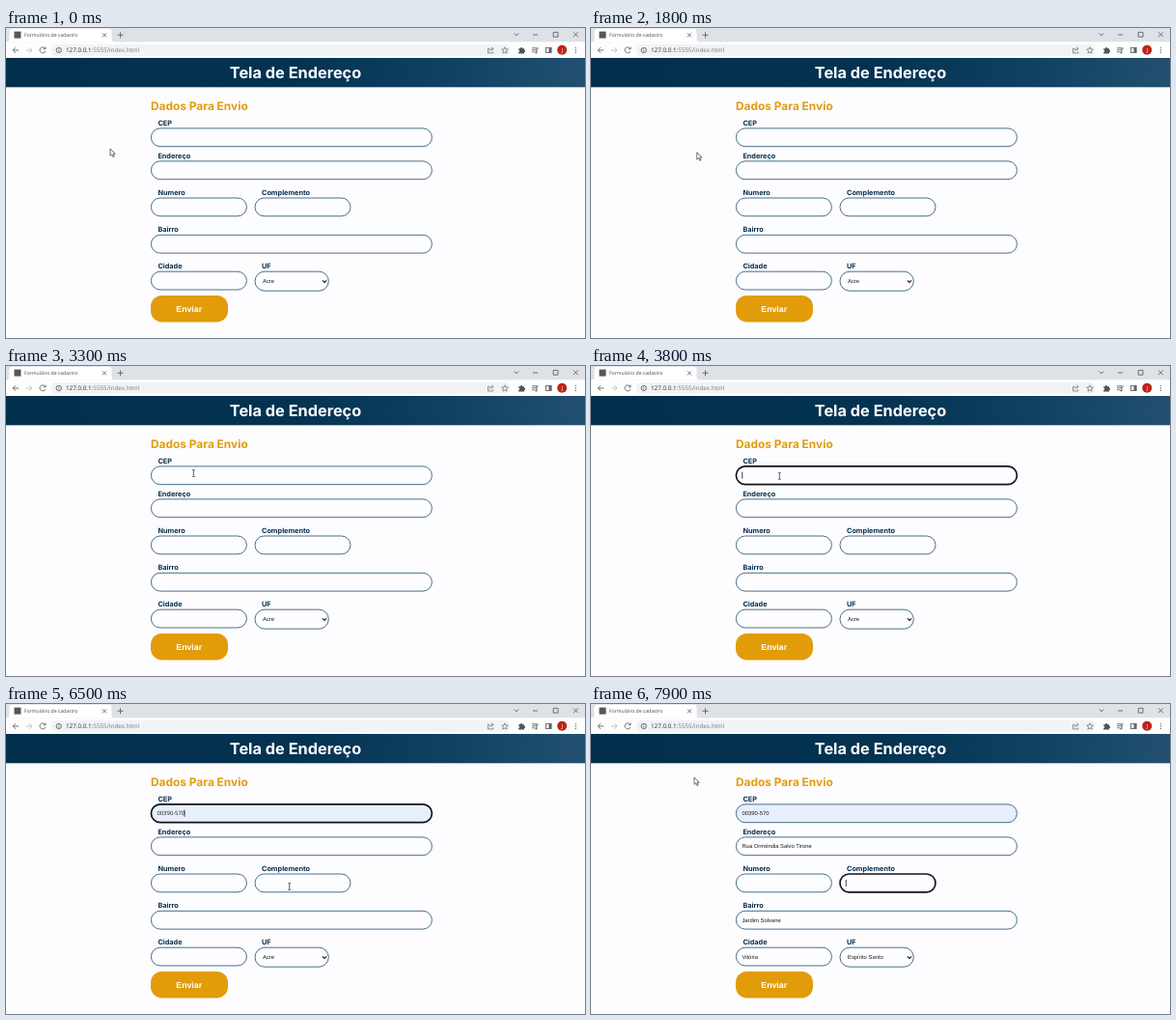
Animation of 600 by 321 pixels, one loop 8000 ms. Source, as an HTML page:

```html
<!DOCTYPE html>
<html lang="pt-BR">
<head>
<meta charset="utf-8">
<title>Formulário de cadastro</title>
<style>
  html, body { margin: 0; width: 100%; height: 100%; overflow: hidden; background: #fdfcfe; }
  svg { display: block; width: 100vw; height: 100vh; }
  text { text-rendering: geometricPrecision; white-space: pre; }
  .ui { font-family: "Open Sans", "Noto Sans", sans-serif; }
  .heading { font-family: Inter, "Open Sans", sans-serif; font-weight: 700; }
  .label { font-family: Inter, "Open Sans", sans-serif; font-weight: 700; font-size: 7.3px; fill: #07304f; }
  .value { font-family: "Liberation Sans", Arial, sans-serif; font-size: 5.86px; fill: #1b1b1b; }
  .value.preview { font-family: "Open Sans", "Noto Sans", sans-serif; }
  .icon { fill: none; stroke: #5f6368; stroke-width: .9; }
  .field { fill: #fefdff; stroke: #35607c; stroke-width: .9; }
  .field.filled { fill: #e7effd; }
  .field.focus { stroke: #10141c; stroke-width: 1.7; }
</style>
</head>
<body>
<svg viewBox="0 0 600 321" preserveAspectRatio="none">
  <defs>
    <linearGradient id="band" gradientUnits="userSpaceOnUse" x1="0" y1="31" x2="600" y2="61">
      <stop offset="0" stop-color="#022f4b"/>
      <stop offset=".5" stop-color="#043352"/>
      <stop offset=".75" stop-color="#0f4062"/>
      <stop offset="1" stop-color="#235070"/>
    </linearGradient>
  </defs>
  <rect width="600" height="321" fill="#fdfcfe"/>

  <!-- tab strip -->
  <rect width="600" height="14.5" fill="#dee1e6"/>
  <path d="M0 14.5Q3.5 14.5 3.5 11V4Q3.5 .8 7 .8H106Q109.5 .8 109.5 4V11Q109.5 14.5 113 14.5Z" fill="#fff"/>
  <rect x="8.5" y="3.6" width="7" height="7" fill="#55565a"/>
  <text class="ui" x="19" y="9.2" font-size="5.1" fill="#45484d">Formulário de cadastro</text>
  <path class="icon" d="M100 5.4l4 4m0-4l-4 4M118.5 4.3v6m-3-3h6M526.7 5.6l2.3 2.2 2.3-2.2M546 7h5M567.2 4.4h4.8v4.8h-4.8zM588 4.4l4.8 4.8m0-4.8l-4.8 4.8"/>

  <!-- toolbar -->
  <rect y="14.5" width="600" height="16.5" fill="#fefefe"/>
  <rect x="46.5" y="16.7" width="476" height="12.6" rx="6.3" fill="#f1f3f4"/>
  <path class="icon" d="M13.2 23H7.2m2.8-2.8L7.2 23l2.8 2.8M40.6 21.3a3 3 0 1 0 .2 2.7M41 19.6v2.2h-2.2"/>
  <path class="icon" style="stroke:#b9bcc0" d="M21 23h6m-2.8-2.8L27 23l-2.8 2.8"/>
  <circle class="icon" cx="54.7" cy="23" r="2.7" stroke-width=".7"/>
  <path class="icon" stroke-width=".8" d="M54.7 22.7v1.8m0-3.1v.7"/>
  <text class="ui" x="62" y="25.2" font-size="6.3" fill="#27292d">127.0.0.1<tspan fill="#73777d">:5555/index.html</tspan></text>
  <path class="icon" style="stroke-width:.7" d="M501.5 21.3h-2v4.6h5.3v-1.5M501.2 24q.3-2.4 3.2-2.5m-1.2-1.7l2 1.7-2 1.7"/>
  <path class="icon" style="stroke-width:.7" d="M517 19.8l1 2.2 2.3.2-1.8 1.6.6 2.3-2.1-1.2-2.1 1.2.6-2.3-1.8-1.6 2.3-.2z"/>
  <path fill="#4f5358" d="M531.2 21.2h1.8a1.1 1.1 0 0 1 2.2 0h1.8v1.6a1.1 1.1 0 0 1 0 2.2v1.4h-5.8v-1.5a1.1 1.1 0 0 0 0-2.2z"/>
  <path class="icon" d="M545 20.8h5M545 22.8h5M545 24.8h2.8M550 25.6V21h1.8"/>
  <circle cx="549.3" cy="25.4" r="1" fill="#5f6368"/>
  <rect class="icon" x="559.5" y="20.3" width="5.6" height="5.2"/>
  <rect x="562.5" y="20.3" width="2.6" height="5.2" fill="#5f6368"/>
  <circle cx="576.2" cy="22.8" r="5" fill="#bd2418"/>
  <text class="ui" x="576.2" y="24.9" font-size="5.6" fill="#fff" text-anchor="middle">J</text>
  <g fill="#5f6368"><circle cx="590.3" cy="20.6" r=".7"/><circle cx="590.3" cy="23" r=".7"/><circle cx="590.3" cy="25.4" r=".7"/></g>

  <!-- page -->
  <rect y="31" width="600" height="30.3" fill="url(#band)"/>
  <text class="heading" x="300" y="52" font-size="16.3" fill="#fff" text-anchor="middle">Tela de Endereço</text>
  <text class="heading" x="150" y="85.2" font-size="11.9" fill="#e29c0c">Dados Para Envio</text>
  <g id="form"></g>
  <path d="M327.9 261.3l2.1 2.1 2.1-2.1" fill="none" stroke="#15181c" stroke-width="1.1"/>
  <rect x="150" y="277" width="80" height="27.4" rx="11.5" fill="#e29c0a"/>
  <text x="189.7" y="293.6" font-family="Liberation Sans, Arial, sans-serif" font-weight="700" font-size="8.78" fill="#fff" text-anchor="middle">Enviar</text>

  <rect id="caret" width=".8" height="7" fill="#111"/>
  <path id="arrow" d="M0 0V7.4L1.8 5.8 3 8.6 4.2 8.1 3 5.3H5.2Z" fill="#fff" stroke="#33363a" stroke-width=".7"/>
  <path id="beam" d="M-1.5-3.5H-.4L0-3.2.4-3.5H1.5M0-3.2V3.2M-1.5 3.5H-.4L0 3.2.4 3.5H1.5" fill="none" stroke="#33363a" stroke-width=".8"/>
</svg>
<script>
const LOOP = 8000;
const FOCUS_CEP = 3500, PREVIEW = 4400, PICK = 5300, DROPDOWN_END = 5500, FOCUS_EXTRA = 6700, LOOKUP = 7000;
const $ = id => document.getElementById(id);

function add(tag, attrs, content = '') {
  const node = document.createElementNS('http://www.w3.org/2000/svg', tag);
  for (const key in attrs) node.setAttribute(key, attrs[key]);
  node.textContent = content;
  $('form').append(node);
  return node;
}

function makeField(label, x, y, w, h = 18.8) {
  add('text', { class: 'label', x: x + 7, y: y - 3.3 }, label);
  const box = add('rect', { class: 'field', x, y, width: w, height: h, rx: h / 2 });
  const text = add('text', { class: 'value', x: x + (label === 'UF' ? 8 : 6), y: y + h / 2 + 2.1 });
  return { x, y, w, h, box, text };
}

const cep = makeField('CEP', 150.4, 103.9, 291);
const street = makeField('Endereço', 150.4, 137.9, 291);
const number = makeField('Numero', 150.4, 176, 99);
const extra = makeField('Complemento', 258, 176, 99);
const district = makeField('Bairro', 150.4, 214.3, 291);
const city = makeField('Cidade', 150.4, 252.2, 99);
const state = makeField('UF', 258, 252.2, 76.3, 20);
const inputs = [cep, street, number, extra, district, city];

// Pointer hot spot: time, x, y
const path = [
  [0, 108, 125], [1600, 108, 125], [1800, 109.8, 128.8], [2500, 109.8, 128.8],
  [3200, 194.3, 111], [3400, 194.3, 111], [3600, 195.3, 113.8], [4200, 195.3, 113.8],
  [4600, 211.8, 157.5], [4800, 212, 164], [5600, 212, 164], [6000, 293.7, 189],
  [7300, 293.7, 189], [7850, 107, 76], [LOOP, 107, 76]
];

function pointerAt(t) {
  const i = path.findIndex((p, k) => k && t <= p[0]);
  const [t0, x0, y0] = path[i - 1], [t1, x1, y1] = path[i];
  const u = (t - t0) / (t1 - t0), e = u * u * (3 - 2 * u);
  return [x0 + (x1 - x0) * e, y0 + (y1 - y0) * e];
}

const inside = (f, x, y) => x > f.x && x < f.x + f.w && y > f.y && y < f.y + f.h;
const blinkOn = since => since >= 0 && since % 1000 < 500;
const show = (node, on) => node.setAttribute('visibility', on ? 'visible' : 'hidden');

function render(t) {
  const cepFocused = t >= FOCUS_CEP && t < FOCUS_EXTRA;
  const extraFocused = t >= FOCUS_EXTRA;
  const found = t >= LOOKUP;

  cep.box.classList.toggle('focus', cepFocused);
  cep.box.classList.toggle('filled', t >= PREVIEW);
  extra.box.classList.toggle('focus', extraFocused);

  cep.text.textContent = t < PREVIEW ? '' : t < PICK ? '00704000' : '00390-570';
  cep.text.classList.toggle('preview', !extraFocused);
  street.text.textContent = found ? 'Rua Orméndia Salvo Tirone' : '';
  district.text.textContent = found ? 'Jardim Solvane' : '';
  city.text.textContent = found ? 'Vitória' : '';
  state.text.textContent = found ? 'Espírito Santo' : 'Acre';

  const picked = t >= DROPDOWN_END;
  const caretOn = extraFocused ? blinkOn(t - FOCUS_EXTRA)
    : picked ? blinkOn(t - DROPDOWN_END)
    : t < PREVIEW && blinkOn(t - FOCUS_CEP);
  show($('caret'), caretOn);
  $('caret').setAttribute('x', extraFocused ? 263.8 : picked ? 184.6 : 156.4);
  $('caret').setAttribute('y', extraFocused ? 182 : 109.7);

  const [x, y] = pointerAt(t);
  const overList = t >= FOCUS_CEP && t < DROPDOWN_END && y > cep.y + cep.h;
  const typing = !overList && inputs.some(f => inside(f, x, y));
  for (const id of ['arrow', 'beam']) $(id).setAttribute('transform', `translate(${x} ${y})`);
  show($('arrow'), !typing);
  show($('beam'), typing);
}

const start = performance.now();
function tick() {
  render((performance.now() - start) % LOOP);
  requestAnimationFrame(tick);
}
tick();
</script>
</body>
</html>
```
